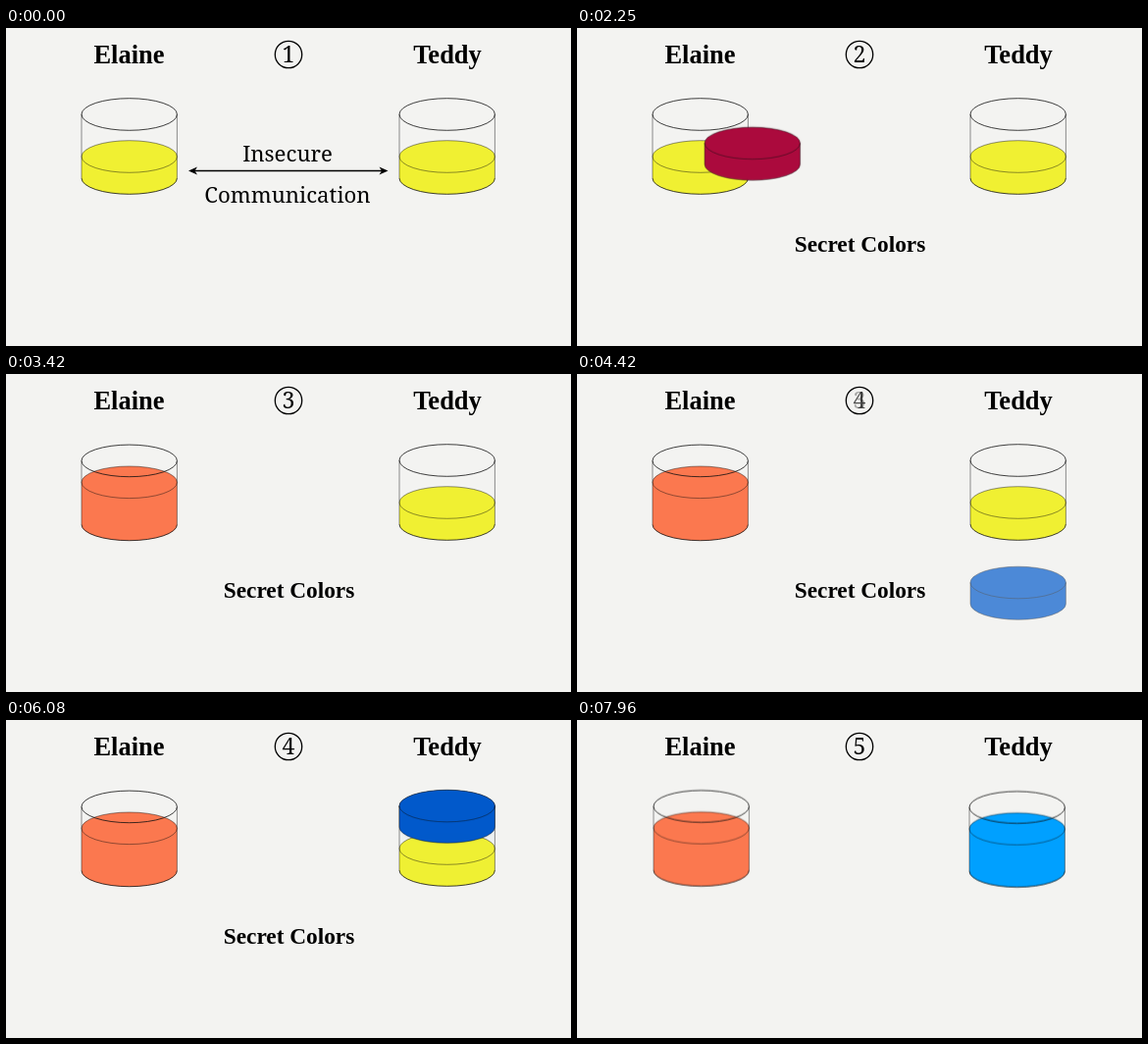
Recreate the animation shown at these times as an HTML page. Size 576 px wide and 324 px high, loop 8 s.

```html
<!DOCTYPE html>
<html lang="en">
<head>
<meta charset="utf-8">
<title>Mixing secret colors</title>
<style>
  html, body { margin: 0; width: 100%; height: 100%; overflow: hidden; background: #f3f3f1; }
  svg { display: block; width: 100vw; height: 100vh; }
  text { text-anchor: middle; fill: #000; }
  .name { font: bold 26.5px "Liberation Serif", serif; }
  .label { font: bold 23.3px "Liberation Serif", serif; }
  .note { font: 22.2px "Noto Serif", serif; }
  .digit { font: 300 23px "Noto Serif", serif; }
  .edge { fill: none; stroke: #111; stroke-width: .8; }
  .thin { fill: none; stroke: #111; stroke-width: .7; stroke-opacity: .65; }
</style>
</head>
<body>
<svg id="stage" viewBox="0 0 576 324">
  <text class="name" x="125.5" y="36">Elaine</text>
  <text class="name" x="450" y="36">Teddy</text>
  <circle cx="288" cy="27" r="13.7" fill="none" stroke="#000" stroke-width="1.3"/>
  <g id="digits"></g>
  <g id="channel">
    <text class="note" x="287" y="136">Insecure</text>
    <text class="note" x="287" y="177.5">Communication</text>
    <path d="M191 145.5H385" stroke="#000" stroke-width="1.4"/>
    <path d="M186 145.5l9-4-2.5 4 2.5 4zM389.5 145.5l-9-4 2.5 4-2.5 4z"/>
  </g>
  <text id="secret" class="label" x="288.5" y="227.5">Secret Colors</text>
</svg>
<script>
const LOOP = 8000, RX = 48.7, RY = 16.3;
const stage = document.getElementById('stage');

function add(parent, tag, attrs) {
  const el = document.createElementNS('http://www.w3.org/2000/svg', tag);
  for (const key in attrs) el.setAttribute(key, attrs[key]);
  return parent.appendChild(el);
}

// steps: [time in ms, value]; the first and last values are held
function track(el, prop, steps) {
  const all = [[0, steps[0][1]], ...steps, [LOOP, steps.at(-1)[1]]];
  el.animate(all.map(([time, value]) => ({ offset: time / LOOP, [prop]: value })),
    { duration: LOOP, iterations: Infinity });
}
const fade = (el, ...steps) => track(el, 'opacity', steps);
const shift = (x, y) => `translate(${x}px, ${y}px)`;

const body = (cx, top, bottom) =>
  `M${cx - RX} ${top}V${bottom}a${RX} ${RY} 0 0 0 ${2 * RX} 0V${top}`;
const ring = (parent, cx, cy, attrs) =>
  add(parent, 'ellipse', { cx, cy, rx: RX, ry: RY, ...attrs });

function liquid(parent, cx, top, bottom, color) {
  add(parent, 'path', { d: body(cx, top, bottom), fill: color });
  ring(parent, cx, top, { fill: color });
  ring(parent, cx, top, { class: 'thin' });
}

function cup(cx, level, color, y = 0) {
  const g = add(stage, 'g', {});
  liquid(g, cx, level, 153 + y, color);
  add(g, 'path', { d: `M${cx - RX} ${88 + y}V${153 + y}M${cx + RX} ${88 + y}V${153 + y}`, class: 'thin' });
  add(g, 'path', { d: body(cx, 153 + y, 153 + y), class: 'edge' });
  ring(g, cx, 88 + y, { class: 'edge' });
  return g;
}

function puck(cx, color) {
  const g = add(stage, 'g', {});
  liquid(g, cx, 212.5, 234, color);
  add(g, 'path', { d: body(cx, 212.5, 234), class: 'thin' });
  return g;
}

// Sideways arc up to a point above the cup, then a slow sink into it
function pour(el, start, side) {
  const steps = [];
  for (let i = 0; i <= 12; i++) {
    const p = i / 12, u = p * p * (3 - 2 * p), v = 1 - u;
    const x = side * 72 * 3 * u * v;
    const y = -40 * 3 * v * v * u - 148 * (3 * v * u * u + u * u * u);
    steps.push([start + 480 * p, shift(x, y)]);
  }
  for (const [dt, y] of [[580, -125], [630, -122.6], [790, -119], [1420, -102.5]])
    steps.push([start + dt, shift(0, y)]);
  track(el, 'transform', steps);
}

function mix({ cx, color, mixed, shown, start, side, drift }) {
  const full = cup(cx, 110.3, mixed, .4);
  const plain = cup(cx, 131, '#f0f032');
  const secret = puck(cx, color);
  fade(full, [start + 580, 0], [start + 630, 1]);
  fade(plain, [start + 580, 1], [start + 770, 0]);
  fade(secret, [shown[0], 0], [shown[1], 1], [start + 580, 1], [start + 790, .9], [start + 1420, 0]);
  pour(secret, start, side);
  track(full, 'transform', [[7880, 0], [7920, .3], [7960, 1], [LOOP, 2]]
    .map(([time, k]) => [time, shift(drift[0] * k, drift[1] * k)]));
}

mix({ cx: 125.7, color: '#ab0a3d', mixed: '#fb784f', shown: [960, 1290],
  start: 2000, side: 1, drift: [1, -.4] });
mix({ cx: 449.7, color: '#0059cb', mixed: '#00a0ff', shown: [4250, 4500],
  start: 5500, side: -1, drift: [-1, .6] });

const changes = [[960, 1290], [2650, 2790], [4250, 4500], [7460, 7710]];
for (let n = 1; n <= 5; n++) {
  const digit = add(document.getElementById('digits'), 'text', { class: 'digit', x: 288, y: 35.2 });
  digit.textContent = n;
  const steps = [];
  if (n > 1) steps.push([changes[n - 2][0], 0], [changes[n - 2][1], 1]);
  if (n < 5) steps.push([changes[n - 1][0], 1], [changes[n - 1][1], 0]);
  fade(digit, ...steps);
}

fade(document.getElementById('channel'), [960, 1], [1290, .04], [2000, .04], [2000, 0]);
fade(document.getElementById('secret'), [960, 0], [1290, 1], [7460, 1], [7710, 0]);
</script>
</body>
</html>
```
